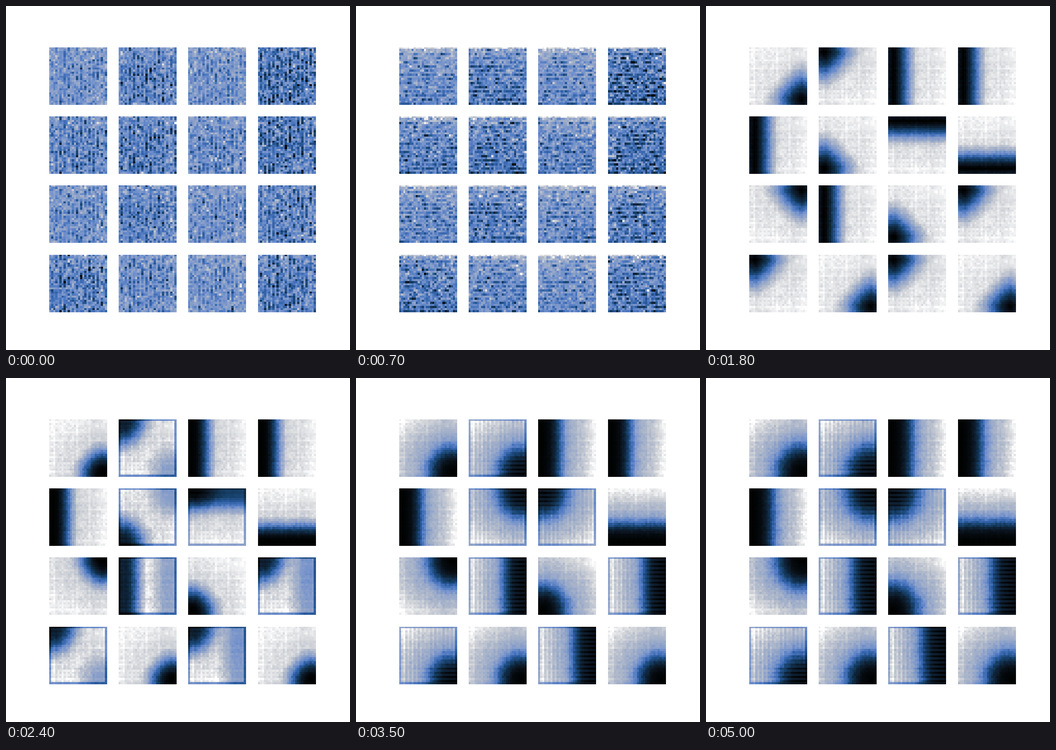
Animation, 748 px wide and 748 px high, one loop 5.1 s. Source, as a matplotlib script:

```python
import numpy as np
import matplotlib.pyplot as plt
from matplotlib.animation import FuncAnimation
from matplotlib.colors import LinearSegmentedColormap

N, PANELS = 28, 16
FRAMES, INTERVAL = 51, 100
NOISE_END, SHAPE_START = 7, 12
V, U = np.mgrid[0:N, 0:N] / (N - 1)
ROW, COL = np.mgrid[0:N, 0:N]
RING = (ROW % (N - 1) == 0) | (COL % (N - 1) == 0)
rng = np.random.default_rng(4)

# Black, navy, blue, grey-lavender, white
BLUES = LinearSegmentedColormap.from_list("blues", [
    "#000100", "#0d1825", "#102c46", "#1a4674", "#2f60a5", "#517bc3",
    "#7794cc", "#94a6c9", "#b0b9cb", "#d4d6da", "#ffffff"])

# Corner or side that is dark in each panel, before and after the flip
BEFORE = "BR TL L L  L BL T B  TR L BL TL  TL BR TL BR".split()
AFTER = "BR BR L L  L TR TL B  TR R BL R  BR BR R BR".split()


def smooth(x):
    x = np.clip(x, 0, 1)
    return x * x * (3 - 2 * x)


def over_time(frame, *values):
    return np.interp(frame, (12, 24, 35, 50), values)


def woven(parity, axis):
    """Noise that is darker and stronger on every other line."""
    a = rng.normal(size=(N, N))
    a += .35 * np.roll(a, 1, axis) * parity
    a = a * (.7 + .5 * parity) - .5 * parity
    return (a - a.mean()) / a.std()


def noise_set(parity, axis):
    common = woven(parity, axis)
    return [.6 * common + .8 * woven(parity, axis) for _ in range(PANELS)]


MEANS = rng.uniform(.47, .61, PANELS)
UPRIGHT = noise_set(COL % 2, 0)
LATTICE = noise_set(ROW % 2, 1)
LINES = rng.normal(size=(N, 1)) + rng.normal(size=(1, N))
GRAIN = .012 * LINES + .016 * rng.normal(size=(N, N))


def noise(i, frame):
    w = min(frame / NOISE_END, 1)
    mix = np.cos(w * np.pi / 2) * UPRIGHT[i] + np.sin(w * np.pi / 2) * LATTICE[i]
    spread = .125 + .4 * (.54 - MEANS[i])
    slope = .06 * (1 - w) * np.exp(-V / .12) + w * (.22 * np.exp(-V / .07)
                                                    - .1 * (V - .4))
    return np.clip(MEANS[i] + spread * mix + slope, 0, 1)


def reach(anchor, frame):
    """Distance from an anchor, 1 at the rim of its dark area."""
    inset = over_time(frame, .1, .05, .05, .05)
    corner = over_time(frame, .95, .66, .72, .78)
    side = over_time(frame, .56, .52, .56, .62)
    power = over_time(frame, .95, 1.6, 2, 2)
    size = (corner if len(anchor) == 2 else side) - inset
    spot = {"L": inset, "T": inset, "R": 1 - inset, "B": 1 - inset}
    total = 0
    for letters, axis in (("LR", U), ("TB", V)):
        for c in set(letters) & set(anchor):
            total = total + (np.abs(axis - spot[c]) / size) ** power
    return total ** (1 / power)


def dark_area(anchor, frame, stripe):
    r = reach(anchor, frame) + .6 * GRAIN
    inner = over_time(frame, -.25, .15, .25, .25)
    floor = over_time(frame, .05, .2, .25, .25)
    lit = smooth((r - inner) / (1.05 - inner))
    # Light areas brighten with distance from the dark one
    light = over_time(frame, 1, .88, .72, .66)
    gain = over_time(frame, 0, .07, .26, .28)
    light = light + gain * np.clip(r - 1, 0, 1) + GRAIN
    img = light * (floor * np.clip(r, 0, 1) + (1 - floor) * lit)
    return img + stripe * (ROW % 2 * .08 * (1 - lit) - COL % 2 * .05 * lit)


def shape(i, frame):
    flip = smooth((frame - 18) / 17) if BEFORE[i] != AFTER[i] else 0
    img = ((1 - flip) * dark_area(BEFORE[i], frame, flip)
           + flip * dark_area(AFTER[i], frame, flip))
    if flip:
        img = img * (1 - .3 * RING * smooth((frame - 16) / 8))
    img = img - img.min()
    return np.clip(img / np.percentile(img, 99.5), 0, 1)


def panel(i, frame):
    w = np.clip((frame - NOISE_END) / (SHAPE_START - NOISE_END), 0, 1)
    if w == 0:
        return noise(i, frame)
    if w == 1:
        return shape(i, frame)
    return (1 - w) * noise(i, frame) + w * shape(i, SHAPE_START)


fig, axes = plt.subplots(4, 4, figsize=(7.48, 7.48), dpi=100)
images = []
for ax in axes.flat:
    ax.axis("off")
    images.append(ax.imshow(np.zeros((N, N)), cmap=BLUES, vmin=0, vmax=1,
                            interpolation="nearest"))


def update(frame):
    for i, image in enumerate(images):
        image.set_data(panel(i, frame))
    return images


anim = FuncAnimation(fig, update, frames=FRAMES, interval=INTERVAL,
                     repeat=True, repeat_delay=0)
plt.show()
```
